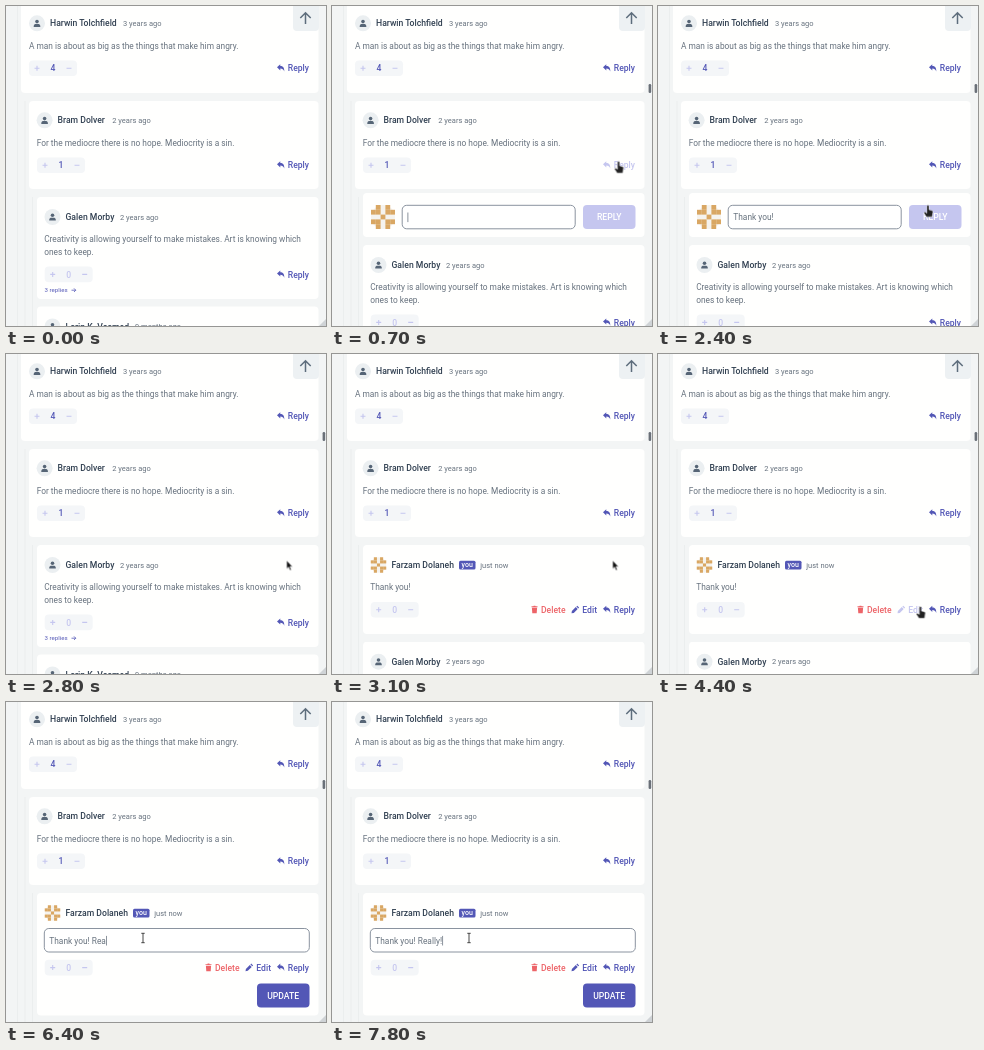
These frames come from a looping animation (320 by 320 pixels, 8000 ms). An HTML page:

```html
<!DOCTYPE html>
<html lang="en">
<head>
<meta charset="utf-8">
<title>Comment thread</title>
<style>
  html, body { margin: 0; width: 100%; height: 100%; overflow: hidden; background: #f3f5f5; }
  svg { display: block; width: 320px; height: 320px; color: #5357b6; }
  text { font-family: Roboto, "Open Sans", sans-serif; white-space: pre; }
  .name { font-size: 8.65px; font-weight: 500; fill: #324152; }
  .time { font-size: 7.5px; fill: #67727e; }
  .body { font-size: 8.36px; fill: #67727e; }
  .act { font-size: 8.6px; font-weight: 500; }
  .more { font-size: 6.1px; fill: #5357b6; }
  .badge { font-size: 7px; font-weight: 500; fill: #fff; }
  .mid { text-anchor: middle; }
  .card { fill: #fffffe; }
  .thread { fill: #ebeeee; }

  /* Hard state changes */
  .step { animation: 8s step-end infinite; }
  #rest { animation-name: rest; }
  #composer { animation-name: composer; }
  #mine { animation-name: mine; }
  #view { animation-name: view; }
  #edit { animation-name: edit; }
  #bar { animation-name: entered; }
  #replyLink { animation-name: replyHover; }
  #editLink { animation-name: editHover; }
  #send { animation-name: send; }

  @keyframes rest {
    0% { transform: none; }
    8.75% { transform: translateY(48px); }
    33.75% { transform: none; }
    36.25% { transform: translateY(96.7px); }
    58.75%, 100% { transform: translateY(130px); }
  }
  @keyframes composer { 0% { visibility: hidden; } 8.75% { visibility: visible; } 33.75%, 100% { visibility: hidden; } }
  @keyframes mine { 0% { visibility: hidden; } 36.25%, 100% { visibility: visible; } }
  @keyframes view { 0% { visibility: hidden; } 36.25% { visibility: visible; } 58.75%, 100% { visibility: hidden; } }
  @keyframes edit { 0% { visibility: hidden; } 58.75%, 100% { visibility: visible; } }
  @keyframes entered { 0% { visibility: hidden; } 1.25%, 100% { visibility: visible; } }
  @keyframes replyHover { 0% { color: #5357b6; } 3.75% { color: #c5c6ef; } 11.25%, 100% { color: #5357b6; } }
  @keyframes editHover { 0% { color: #5357b6; } 53.75% { color: #c5c6ef; } 58.75%, 100% { color: #5357b6; } }
  @keyframes send { 0% { fill: #c5c6ef; } 20% { fill: #5357b6; } 28.75%, 100% { fill: #c5c6ef; } }

  /* Pointer */
  #pointer { animation: travel 8s linear infinite; }
  #arrow { animation-name: arrow; }
  #hand { animation-name: hand; }
  #beam { animation-name: beam; }
  @keyframes travel {
    0%, 1.25% { transform: translate(314px, 128px); }
    3.75%, 9% { transform: translate(286.6px, 155.8px); }
    15% { transform: translate(233px, 177px); }
    17.5%, 21.25% { transform: translate(232.4px, 176px); }
    32.5%, 48.75% { transform: translate(280.6px, 206.4px); }
    55%, 59% { transform: translate(262.4px, 253px); }
    66.25%, 100% { transform: translate(137px, 236px); }
  }
  @keyframes arrow {
    0% { visibility: hidden; } 1.25% { visibility: visible; }
    3% { visibility: hidden; } 11.25% { visibility: visible; }
    28.75% { visibility: hidden; } 33.75% { visibility: visible; }
    53.75% { visibility: hidden; } 60% { visibility: visible; }
    65%, 100% { visibility: hidden; }
  }
  @keyframes hand {
    0% { visibility: hidden; } 3% { visibility: visible; }
    11.25% { visibility: hidden; } 28.75% { visibility: visible; }
    33.75% { visibility: hidden; } 53.75% { visibility: visible; }
    60%, 100% { visibility: hidden; }
  }
  @keyframes beam { 0% { visibility: hidden; } 65%, 100% { visibility: visible; } }
</style>
</head>
<body>
<svg id="stage" viewBox="0 0 320 320"></svg>
<script>
const BLUE = '#5357b6', PALE = '#c5c6ef', RED = '#ed6468';

const text = (cls, x, y, str, attrs = '') =>
  `<text class="${cls}" x="${x}" y="${y}" ${attrs}>${str}</text>`;
const rect = (x, y, w, h, r, attrs) =>
  `<rect x="${x}" y="${y}" width="${w}" height="${h}" rx="${r}" ${attrs}/>`;
const card = (x, top, bottom) => rect(x, top, 312.5 - x, bottom - top, 4, 'class="card"');
const at = (x, y, inner) => `<g transform="translate(${x} ${y})">${inner}</g>`;
const step = (id, inner) => `<g id="${id}" class="step">${inner}</g>`;

const person = (x, y) => at(x, y, `
  <circle r="8" fill="#ebeff1"/>
  <circle cy="-1.7" r="1.8" fill="#566576"/>
  <path d="M-3.3 3.6V3C-3.3 1.4-2.2.8-1 .8H1C2.2.8 3.3 1.4 3.3 3V3.6z" fill="#566576"/>`);

// Mirrored 5 x 5 block pattern
function blocks(x, y, size) {
  const cell = size / 5;
  const rows = ['01010', '11011', '00100', '11011', '01010'];
  let out = `<circle r="${size / 2}" fill="#f5f3ee"/>`;
  rows.forEach((row, j) => [...row].forEach((on, i) => {
    if (on === '1') {
      out += rect((i - 2.5) * cell, (j - 2.5) * cell, cell, cell, 0, 'fill="#d9a763"');
    }
  }));
  return at(x, y, out);
}

function votes(x, y, n, off) {
  return at(x, y, rect(0, -7.8, 48, 15.6, 4, 'fill="#f4f6f8"') +
    `<path d="M5.5 0h5M8 -2.5v5M37.5 0h5" stroke="${PALE}" stroke-width="1.1"/>` +
    text('act mid', 24, 3.1, n, `fill="${off ? PALE : BLUE}"`));
}

const reply = y => at(271, y, `
  <path d="M0-.9 3.3-4V-2.1C6-2.1 7.4-.5 7.3 3.3 6.4 1.2 5.3.4 3.3.4V2.2z" fill="currentColor"/>` +
  text('act', 10.8, 3.1, 'Reply', 'fill="currentColor"'));
const remove = y => at(199.5, y, `
  <path d="M0-3.4H1.8L2.2-4H3.8L4.2-3.4H6V-2.5H0zM.4-1.9H5.6L5.2 3.6H.8z" fill="${RED}"/>` +
  text('act', 9.5, 3.1, 'Delete', `fill="${RED}"`));
const change = y => at(239.5, y, `
  <path d="M0 3.6.4 1.3 4.3-2.6 6.2-.7 2.3 3.2zM4.9-3.2 5.7-4 7.6-2.1 6.8-1.3z" fill="currentColor"/>` +
  text('act', 10.8, 3.1, 'Edit', 'fill="currentColor"'));

const head = (x, y, name, age, ageX) =>
  person(x, y) + text('name', x + 13, y + 3, name) + text('time', ageX, y + 2.8, age);
const input = (x, y, w) =>
  rect(x, y, w, 23.5, 4.5, 'fill="#fff" stroke="#8a939f"');
const button = (y, label, attrs) =>
  rect(251, y, 52.5, 24, 4, attrs) + text('act mid', 277.2, y + 15.1, label, 'fill="#fff"');
const field = (id, x, y) =>
  text('body', x, y, '', `id="${id}"`) + rect(x, y - 7.6, .8, 9.6, 0, `id="${id}Caret" fill="#324152"`);
const line = (x, y, h) => rect(x, y, 1, h, 0, 'class="thread"');

const first = card(15, -10, 87) +
  head(31, 17.3, 'Harwin Tolchfield', '3 years ago', 117) +
  text('body', 22.9, 43.2, 'A man is about as big as the things that make him angry.') +
  votes(23, 62.2, 4) + reply(62.2);

const second = card(23, 95, 183) +
  head(38.6, 114.3, 'Bram Dolver', '2 years ago', 106.3) +
  text('body', 30.7, 140, 'For the mediocre there is no hope. Mediocrity is a sin.') +
  votes(31, 159.2, 1) + step('replyLink', reply(159.2));

const rest = card(31, 191, 293) +
  head(46.5, 211, 'Galen Morby', '2 years ago', 114) +
  text('body', 38.2, 236.2, 'Creativity is allowing yourself to make mistakes. Art is knowing which') +
  text('body', 38.2, 249, 'ones to keep.') +
  votes(38.7, 268.4, 0, true) + reply(268.4) +
  text('more', 38.6, 286.3, '3 replies') +
  `<path d="M65.5 284.2h4.2M68 282.4l1.8 1.8-1.8 1.8" fill="none" stroke="${BLUE}" stroke-width=".8"/>` +
  card(31, 300.5, 400) +
  head(46.5, 320.5, 'Lorin K. Vosmed', '9 months ago', 129);

const composer = card(31, 187, 231) + blocks(51, 211, 24) + input(70.2, 199.3, 173) +
  field('draft', 75.3, 214.1) + button(199, 'REPLY', 'id="send" class="step"');

const mine =
  step('view', card(31, 191, 280) + text('body', 38.2, 236.2, 'Thank you!') +
    votes(38.7, 255.7, 0, true) + remove(255.7) + step('editLink', change(255.7)) + reply(255.7)) +
  step('edit', card(31, 191, 313.5) + input(38.3, 226.5, 265) + field('fix', 43.3, 241.5) +
    votes(38.7, 265.6, 0, true) + remove(265.6) + change(265.6) + reply(265.6) +
    button(281.5, 'UPDATE', `fill="${BLUE}"`)) +
  blocks(46.5, 211, 15.5) + text('name', 59.4, 214, 'Farzam Dolaneh') +
  rect(127, 206.8, 16.5, 8.6, 1.5, `fill="${BLUE}"`) + text('badge mid', 135.2, 213, 'you') +
  text('time', 148.3, 213.8, 'just now');

const chrome = rect(287, -6, 26, 31, 4, 'fill="#edf1f3"') +
  '<path d="M299.5 18V7M294.3 12l5.2-5.2 5.2 5.2" fill="none" stroke="#5d6d7c" stroke-width="1.5"/>' +
  '<path d="M320 313v7h-7z" fill="#cfd3d6"/>' +
  step('bar', rect(316.6, 78, 2.6, 9, 1.2, 'fill="#6a7078"'));

const pointer = `<g id="pointer">
  <path id="arrow" class="step" d="M0 0V8.4L1.9 6.7 3.3 9.9 4.7 9.2 3.4 6.2H5.9z" fill="#111" stroke="#fff" stroke-width=".6"/>
  <path id="hand" class="step" d="M-1.1 0Q0-1.1 1 0V4L4.3 5Q5 5.4 4.9 6.6L4.1 11.2H-1.5L-4 7.3Q-3.8 6-2.6 6.4L-1.1 7.5z" fill="#222" stroke="#fff" stroke-width=".4"/>
  <path id="beam" class="step" d="M-1.7-4.7H1.7M0-4.7V4.7M-1.7 4.7H1.7" fill="none" stroke="#333" stroke-width=".9"/>
</g>`;

document.getElementById('stage').innerHTML =
  rect(0, 0, 320, 320, 0, 'fill="#f3f5f5"') +
  line(11, 0, 320) + line(18.5, 95, 225) + line(26, 191, 129) +
  first + second + step('rest', rest) + step('composer', composer) + step('mine', mine) +
  chrome + pointer;

// Typing
const added = ' Really!';
const keyTimes = [5800, 6100, 6200, 6400, 6600, 6700, 7000, 7700];

function type(id, str, caretOn) {
  const el = document.getElementById(id);
  const caret = document.getElementById(id + 'Caret');
  if (el.textContent !== str) el.textContent = str;
  caret.setAttribute('x', +el.getAttribute('x') + (str ? el.getComputedTextLength() : 0) + .2);
  caret.setAttribute('opacity', caretOn ? .7 : 0);
}

let start;
function tick(now) {
  start ??= now;
  const t = (now - start) % 8000;
  const count = keyTimes.filter(k => t >= k).length;
  type('draft', t >= 1600 ? 'Thank you!' : '', t < 2300);
  type('fix', 'Thank you!' + added.slice(0, count), true);
  requestAnimationFrame(tick);
}
requestAnimationFrame(tick);
</script>
</body>
</html>
```
